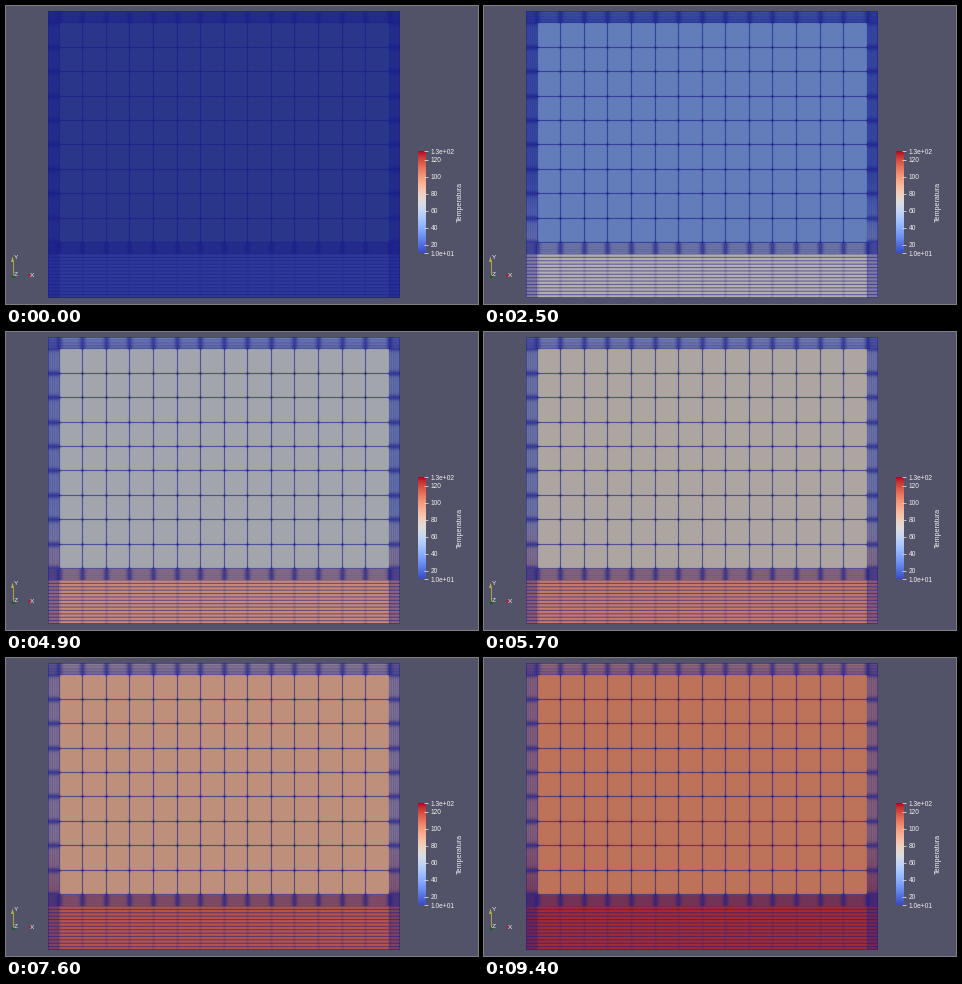
Write a matplotlib script that moves like this. It is 472 px wide and 298 px high and loops after 9500 ms.

```python
import numpy as np
import matplotlib.pyplot as plt
from matplotlib.animation import FuncAnimation
from matplotlib.patches import Polygon, Circle

W, H, DPI = 472, 298, 100
FRAMES, STEP = 95, 100
BACK = np.array([82, 83, 104]) / 255
EDGE = np.array([25, 28, 138]) / 255
CMAP = plt.get_cmap("coolwarm")

# Mesh limits in pixels: outer box, wide cells and heated base
LEFT, RIGHT, TOP, BOTTOM = 42, 394, 5, 292
X0, X1, Y0, Y1, BASE = 53.2, 383.2, 16.7, 236.6, 248
# Grid lines sit on whole pixels
COLS = np.floor(np.linspace(X0, X1, 15)) + 0.5
ROWS = np.floor(np.linspace(Y0, Y1, 10)) + 0.5

# Mean temperature over time (s) of the wide cells and of the base
KEYS = [0, 1.2, 2.5, 3.8, 4.9, 6.5, 8.6, 9.4]
CELL_T = [10, 24, 38, 55, 67, 79, 97, 102]
BASE_T = [10, 47, 73, 86, 95, 107, 120, 124]


def lines(axis, spots, width):
    """Antialiased coverage of thin lines along one axis."""
    dist = np.abs(axis[:, None] - np.asarray(spots)[None, :])
    return np.clip(0.5 + width / 2 - dist, 0, 1).max(axis=1)


def halo(axis, spots, spread):
    dist = np.abs(axis[:, None] - np.asarray(spots)[None, :])
    return np.exp(-(dist / spread) ** 2).max(axis=1)


def over(*layers):
    """Combined opacity of stacked layers."""
    clear = 1
    for layer in layers:
        clear = clear * (1 - layer)
    return 1 - clear


def build_edges():
    x, y = np.arange(W) + 0.5, np.arange(H) + 0.5
    gx, gy = x[None, :], y[:, None]
    col_line, row_line = lines(x, COLS, 1)[None, :], lines(y, ROWS, 1)[:, None]
    col_halo, row_halo = halo(x, COLS, 1.4)[None, :], halo(y, ROWS, 1.4)[:, None]
    col_wide, row_wide = halo(x, COLS, 2.8)[None, :], halo(y, ROWS, 2.8)[:, None]

    cells = over(0.58 * col_line, 0.58 * row_line, 0.08 * col_halo,
                 0.08 * row_halo, 0.6 * col_halo * row_halo)

    side_spots = np.r_[np.linspace(LEFT, X0, 6), np.linspace(X1, RIGHT, 6)]
    side_lines = lines(x, side_spots, 0.8)[None, :]
    sides = over(0.36, 0.22 * side_lines, 0.6 * row_wide)

    top_lines = lines(y, np.linspace(TOP, Y0, 5), 0.9)[:, None]
    depth = np.clip((gy - TOP) / (Y0 - TOP), 0, 1)
    top = over(0.25 + 0.18 * depth, 0.3 * top_lines, 0.58 * col_wide)

    seam_lines = lines(y, np.linspace(Y1, BASE, 6), 0.7)[:, None]
    seam = over(0.35, 0.15 * seam_lines, 0.6 * col_wide)

    base_lines = lines(y, np.linspace(BASE, BOTTOM, 14), 1.1)[:, None]
    base = over(0.05, 0.55 * base_lines, 0.15 * col_halo)

    in_side = (gx < X0) | (gx > X1)
    in_top, in_seam, in_base = gy < Y0, (gy > Y1) & (gy < BASE), gy >= BASE
    edges = np.where(in_side, sides, cells)
    edges = np.where(in_top, np.where(in_side, over(top, 0.4), top), edges)
    edges = np.where(in_seam, np.where(in_side, over(seam, 0.5), seam), edges)
    edges = np.where(in_base, np.where(in_side, over(base, 0.35), base), edges)

    rim = over(lines(x, [LEFT + 0.5, RIGHT - 0.5], 1)[None, :],
               lines(y, [TOP + 0.5, BOTTOM - 0.5], 1)[:, None])
    edges = over(edges, 0.45 * rim)

    # Share of base heat: full in the base, partial in the seam, cool walls
    wall = 0.9 * np.clip((gy - 175) / (Y1 - 175), 0, 1) * in_side
    wall = wall - 0.35 * (in_side | in_top)
    heat = np.where(in_base, 1, np.where(in_seam, 0.7, wall))
    inside = (gx > LEFT) & (gx < RIGHT) & (gy > TOP) & (gy < BOTTOM)
    return edges[..., None], heat, inside[..., None]


EDGES, HEAT, INSIDE = build_edges()


def picture(frame):
    t = frame * STEP / 1000
    cell, base = np.interp(t, KEYS, CELL_T), np.interp(t, KEYS, BASE_T)
    level = np.clip((cell + (base - cell) * HEAT - 10) / 120, 0, 1)
    shade = (0.72 + 0.08 * level + 0.07 * (HEAT == 1))[..., None]
    face = CMAP(level)[..., :3] * shade
    mesh = face * (1 - EDGES) + EDGE * EDGES
    return np.where(INSIDE, mesh, BACK)


fig = plt.figure(figsize=(W / DPI, H / DPI), dpi=DPI, facecolor=BACK)
ax = fig.add_axes([0, 0, 1, 1])
ax.axis("off")
view = ax.imshow(picture(0), extent=(0, W, H, 0), interpolation="nearest",
                 aspect="auto")


def label(x, y, text, px=6.7, **style):
    style = {"color": "#eeeeee", "ha": "left", "va": "center_baseline", **style}
    ax.text(x, y, text, family="Liberation Sans", fontsize=px * 72 / DPI, **style)


def stroke(xs, ys, color, width=1):
    ax.plot(xs, ys, color=color, lw=width * 72 / DPI, solid_capstyle="butt")


def draw_scale():
    ramp = np.linspace(1, 0, 256)[:, None]
    ax.imshow(ramp, cmap=CMAP, extent=(412, 420, 247, 145), aspect="auto")
    for value in (130, 120, 100, 80, 60, 40, 20, 10):
        y = 247 - (value - 10) * 0.85
        stroke([418, 422], [y, y], "#dddddd", 0.8)
        text = f"{value:.1e}" if value in (10, 130) else str(value)
        label(424.5, y, text)
    label(454, 196, "Temperatura", 7.2, rotation=90, ha="center", va="center")


def draw_triad():
    stroke([6.5, 6.5], [269, 254], "#aaa343", 1)
    ax.add_patch(Polygon([(5, 256), (8, 256), (6.5, 250.5)], color="#b8b040", lw=0))
    ax.add_patch(Polygon([(22, 267.8), (22, 271.2), (25.5, 269.5)], color="#b02030", lw=0))
    ax.add_patch(Circle((7.5, 270.5), 1.8, color="#1f5b2c", lw=0))
    label(7.5, 251, "Y", 6.5)
    label(8, 268.5, "Z", 6.5)
    label(24, 269, "X", 6.5)


draw_scale()
draw_triad()
ax.set_xlim(0, W)
ax.set_ylim(H, 0)


def update(frame):
    view.set_data(picture(frame))
    return (view,)


anim = FuncAnimation(fig, update, frames=FRAMES, interval=STEP, repeat=True,
                     repeat_delay=0, blit=False)
plt.show()
```
